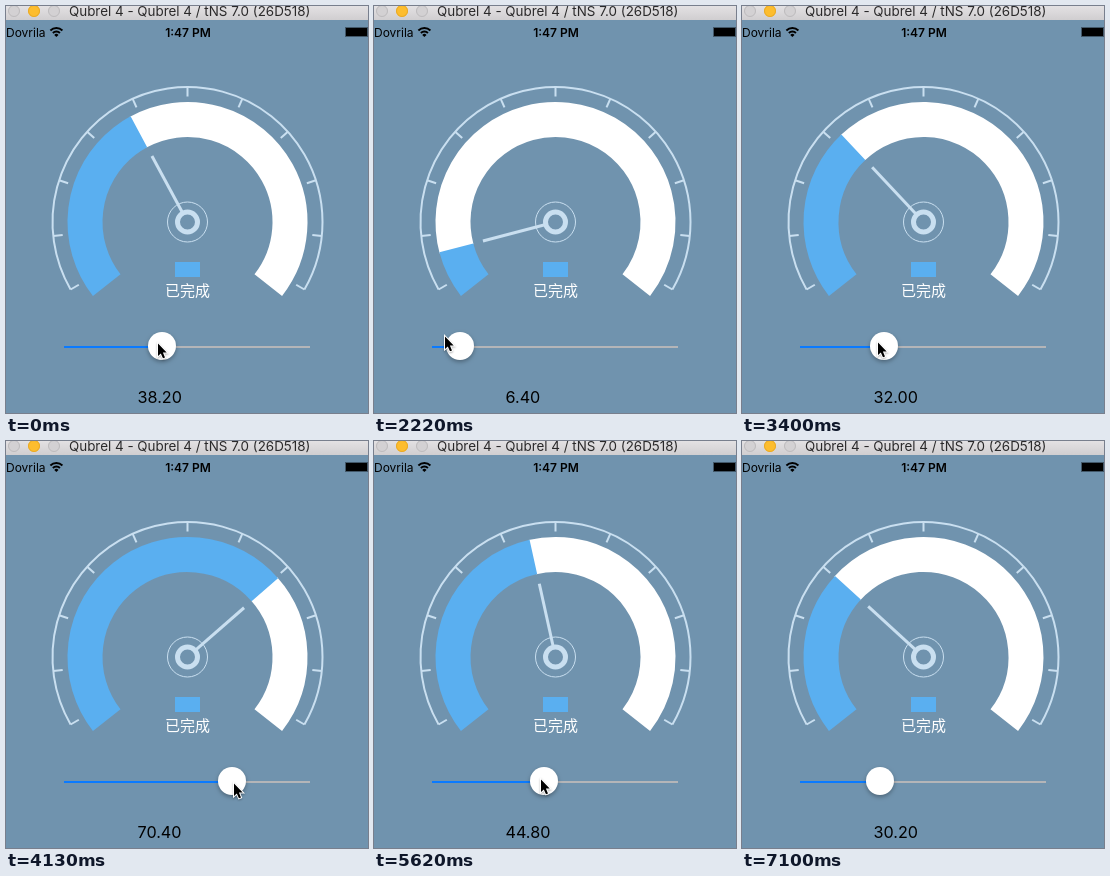
Write an HTML page with a canvas that moves like this. It is 362 px wide and 407 px high and loops after 7.82 s.

```html
<!DOCTYPE html>
<html lang="zh">
<head>
<meta charset="utf-8">
<title>Gauge</title>
<style>
html, body { margin: 0; width: 100%; height: 100%; overflow: hidden; background: #7093ae; }
canvas { display: block; width: 362px; height: 407px; }
</style>
</head>
<body>
<canvas id="stage"></canvas>
<script>
const W = 362, H = 407, LOOP = 7820, STEP = 147.8;
const CX = 181.5, CY = 216, TURN = 2 * Math.PI;
const PALE = '#c9dff0', BLUE = '#5aaff0', BACK = '#7093ae';
const SANS = 'Inter, "Liberation Sans", sans-serif';

const canvas = document.getElementById('stage');
const ctx = canvas.getContext('2d');
const ratio = window.devicePixelRatio || 1;
canvas.width = W * ratio;
canvas.height = H * ratio;

// Turning points of the drag: [step, value]
const KEYS = [
  [0, 38.2], [5, 6.2], [7, 11.8], [8, 11.8], [10, 2.6], [12, 2.6], [15, 6.4],
  [20, 17.4], [23, 32], [31, 82.6], [33, 71], [38, 44.8], [45, 30.2]
];

const rad = deg => deg * Math.PI / 180;
const valueAngle = v => rad(150 + 2.4 * v);

const secant = i => (KEYS[i + 1][1] - KEYS[i][1]) / (KEYS[i + 1][0] - KEYS[i][0]);

// Harmonic mean keeps the curve from overshooting; extremes are flat
function slope(i) {
  if (i === 0 || i === KEYS.length - 1) return 0;
  const a = secant(i - 1), b = secant(i);
  return a * b > 0 ? 2 * a * b / (a + b) : 0;
}

function valueAt(step) {
  const i = KEYS.findIndex(k => k[0] > step) - 1;
  if (i < 0) return KEYS[KEYS.length - 1][1];
  const [s0, v0] = KEYS[i], [s1, v1] = KEYS[i + 1];
  const span = s1 - s0, p = (step - s0) / span, q = 1 - p;
  const v = v0 + (v1 - v0) * p * p * (3 - 2 * p)
    + span * p * q * (slope(i) * q - slope(i + 1) * p);
  return Math.round(v * 5) / 5;
}

function arc(x, y, r, from, to, width, color) {
  ctx.beginPath();
  ctx.arc(x, y, r, from, to);
  ctx.lineWidth = width;
  ctx.strokeStyle = color;
  ctx.stroke();
}

function disc(x, y, r, color) {
  ctx.beginPath();
  ctx.arc(x, y, r, 0, TURN);
  ctx.fillStyle = color;
  ctx.fill();
}

function ray(angle, from, to, width) {
  const c = Math.cos(angle), s = Math.sin(angle);
  ctx.beginPath();
  ctx.moveTo(CX + c * from, CY + s * from);
  ctx.lineTo(CX + c * to, CY + s * to);
  ctx.lineWidth = width;
  ctx.strokeStyle = PALE;
  ctx.stroke();
}

function rect(x, y, w, h, color) {
  ctx.fillStyle = color;
  ctx.fillRect(x, y, w, h);
}

function label(text, x, y, font, color, align = 'left') {
  ctx.font = font;
  ctx.fillStyle = color;
  ctx.textAlign = align;
  ctx.fillText(text, x, y);
}

function drawWindow() {
  rect(0, 0, W, H, BACK);
  const bar = ctx.createLinearGradient(0, 0, 0, 14);
  bar.addColorStop(0, '#e3e1e3');
  bar.addColorStop(1, '#d0ced0');
  rect(0, 0, W, 14, bar);
  for (const x of [8, 48]) {
    disc(x, 5, 6, '#d3d1d3');
    arc(x, 5, 5.5, 0, TURN, 1, '#bdbbbd');
  }
  disc(28, 5, 6, '#fdbd2e');
  arc(28, 5, 5.5, 0, TURN, 1, '#e8a927');
  label('Qubrel 4 - Qubrel 4 / tNS 7.0 (26D518)', 63, 10, '13.4px ' + SANS, '#2a292a');
}

function drawStatus() {
  label('Dovrila', 0, 31, '12px ' + SANS, '#000');
  label('1:47 PM', 182, 31, '600 12px ' + SANS, '#000', 'center');
  for (const r of [5, 8.5]) arc(50.4, 30.5, r, rad(225), rad(315), 1.9, '#000');
  ctx.beginPath();
  ctx.moveTo(50.4, 31);
  ctx.arc(50.4, 31, 3, rad(225), rad(315));
  ctx.fillStyle = '#000';
  ctx.fill();
  ctx.lineWidth = 1;
  ctx.strokeStyle = 'rgba(0,0,0,0.4)';
  ctx.strokeRect(339.5, 21.5, 22, 9);
  rect(340, 22, 21, 8, '#000');
}

function drawGauge(value) {
  const a = valueAngle(value);
  arc(CX, CY, 135, rad(150), rad(390), 2, PALE);
  for (let i = 0; i <= 10; i++) ray(valueAngle(i * 10), 125.5, 135, 2);
  arc(CX, CY, 102.5, a - 0.01, rad(398), 35, '#fff');
  arc(CX, CY, 102.5, rad(142), a, 35, BLUE);
  arc(CX, CY, 20, 0, TURN, 1, PALE);
  arc(CX, CY, 10, 0, TURN, 5, PALE);
  ray(a, 11, 75, 3);
  rect(169, 256, 25, 15, BLUE);
  label('已完成', CX, 290, '500 15px "Noto Sans CJK SC", "Noto Sans CJK", sans-serif', '#fff', 'center');
}

function drawSlider(value, x) {
  rect(58, 340, 246, 2, '#b4b5b8');
  rect(58, 340, x - 58, 2, '#0a7aff');
  ctx.save();
  ctx.shadowColor = 'rgba(0,0,0,0.3)';
  ctx.shadowBlur = 4 * ratio;
  ctx.shadowOffsetY = 2 * ratio;
  disc(x, 340, 14, '#fff');
  ctx.restore();
  label(value.toFixed(2), 131.5, 397, '16.2px ' + SANS, '#000');
}

function drawPointer(x, y) {
  ctx.save();
  ctx.translate(x, y);
  ctx.beginPath();
  ctx.moveTo(1, 1.5);
  for (const [px, py] of [[1, 14], [3.8, 11.4], [6, 16.3], [8, 15.4], [5.9, 10.6], [9.7, 10.6]]) {
    ctx.lineTo(px, py);
  }
  ctx.closePath();
  ctx.shadowColor = 'rgba(0,0,0,0.3)';
  ctx.shadowBlur = 2 * ratio;
  ctx.shadowOffsetY = ratio;
  ctx.lineWidth = 2;
  ctx.strokeStyle = '#fff';
  ctx.stroke();
  ctx.shadowColor = 'transparent';
  ctx.fillStyle = '#000';
  ctx.fill();
  ctx.restore();
}

function draw(now) {
  const step = Math.floor((now % LOOP + 9) / STEP);
  const value = valueAt(step);
  const thumb = Math.round(72.4 + 2.18 * value);
  ctx.setTransform(ratio, 0, 0, ratio, 0, 0);
  drawWindow();
  drawStatus();
  drawGauge(value);
  drawSlider(value, thumb);
  // The pointer trails the thumb, then lets go and leaves
  const reach = Math.sqrt(value);
  if (step < 47) drawPointer(Math.round(thumb - 24 + 3 * reach), Math.round(323.3 + 2.1 * reach));
  else if (step === 47) drawPointer(172, 365);
}

const start = performance.now();
function tick() {
  draw(performance.now() - start);
  requestAnimationFrame(tick);
}
tick();
</script>
</body>
</html>
```
